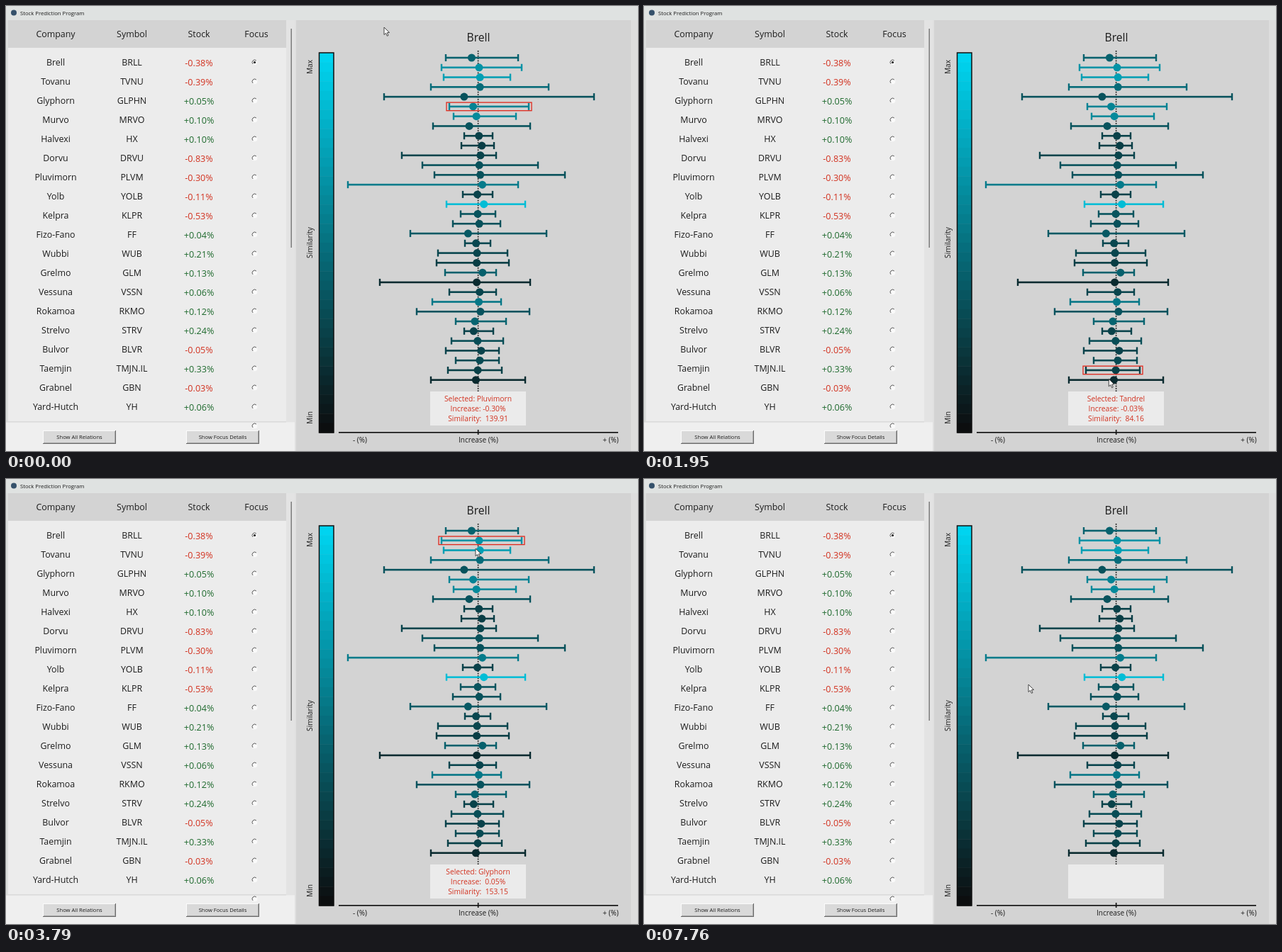
An HTML page with a canvas for the animation above (8140 ms loop, 891 by 628 pixels).

```html
<!DOCTYPE html>
<html lang="en">
<head>
<title>Stock Prediction Program</title>
<style>
html, body { margin: 0; width: 100%; height: 100%; overflow: hidden; background: #dfe2e1; }
canvas { display: block; width: 891px; height: 628px; }
</style>
</head>
<body>
<canvas id="stage" width="891" height="628"></canvas>
<script>
const LOOP = 8140, LAG = 56;
const FOCUS = 'Brell';
const RED = '#d2311f', GREEN = '#1f6a2e', INK = '#1c1c1c';
const CENTER = 665.5, ROW_TOP = 73, ROW_STEP = 13.78;
const ctx = document.getElementById('stage').getContext('2d');

// Table rows: name, symbol, change in percent
const listed = [
  [FOCUS, 'BRLL', '-0.38'], ['Tovanu', 'TVNU', '-0.39'], ['Glyphorn', 'GLPHN', '+0.05'],
  ['Murvo', 'MRVO', '+0.10'], ['Halvexi', 'HX', '+0.10'], ['Dorvu', 'DRVU', '-0.83'],
  ['Pluvimorn', 'PLVM', '-0.30'], ['Yolb', 'YOLB', '-0.11'], ['Kelpra', 'KLPR', '-0.53'],
  ['Fizo-Fano', 'FF', '+0.04'], ['Wubbi', 'WUB', '+0.21'], ['Grelmo', 'GLM', '+0.13'],
  ['Vessuna', 'VSSN', '+0.06'], ['Rokamoa', 'RKMO', '+0.12'], ['Strelvo', 'STRV', '+0.24'],
  ['Bulvor', 'BLVR', '-0.05'], ['Taemjin', 'TMJN.IL', '+0.33'], ['Grabnel', 'GBN', '-0.03'],
  ['Yard-Hutch', 'YH', '+0.06']
];
// Companies further down the scrolled list
const hidden = [
  ['Ondrel', '-0.60'], ['Vastim', '-0.13'], ['Horuzo', '-0.07'], ['Kembry', '-0.09'],
  ['Trovalt', '+0.25'], ['Ulmsten', '-0.09'], ['Parvolo', '+0.08'], ['Zennick', '+0.03'],
  ['Wexlund', '+0.13'], ['Cordumb', '-0.20'], ['Olvane', '-0.27'], ['Bruzel', '-0.04'],
  ['Haldune', '+0.17'], ['Merquil', '+0.09'], ['Tandrel', '-0.03'], ['Ixoline', '-0.14']
];
// Range ends and similarity of each chart row
const ranges = [
  [620, 722, 112.37], [614, 727, 153.15], [617, 711, 163.42], [599, 765, 120.18], [533, 829, 99.26],
  [625, 737, 139.91], [631, 719, 145.33], [602, 739, 100.11], [646, 686, 85.47], [642, 688, 82.09],
  [558, 691, 87.64], [587, 750, 98.72], [604, 788, 98.15], [482, 722, 133.58], [644, 686, 86.21],
  [621, 732, 188.20], [641, 690, 100.82], [630, 697, 98.43], [570, 762, 104.77], [647, 683, 90.36],
  [609, 707, 89.06], [607, 709, 82.51], [619, 691, 110.69], [527, 739, 66.84], [625, 691, 88.13],
  [601, 698, 130.25], [579, 738, 100.47], [634, 705, 113.92], [646, 687, 85.70], [628, 701, 94.97],
  [620, 695, 86.38], [634, 695, 92.54], [623, 699, 84.16], [599, 732, 66.29]
];
// Pointer waypoints: time, x, y
const path = [
  [0, 533, 30], [420, 625, 52], [700, 660, 100], [1530, 657, 361], [2000, 655, 530],
  [2460, 651, 448], [3360, 657, 58], [3790, 662, 98], [4460, 674, 281], [4910, 673, 282],
  [5180, 673, 282], [5440, 668, 295], [5940, 668, 295], [6170, 667, 300], [6550, 668, 306],
  [7070, 668, 306], [7500, 510, 298], [7760, 542, 290]
];

function shade(f) {
  const mix = (a, b) => Math.round(a + (b - a) * f);
  return `rgb(${mix(12, 0)},${mix(14, 212)},${mix(15, 240)})`;
}

const bars = listed.slice(1).map(([name, , change]) => [name, change]).concat(hidden)
  .map(([name, change], i) => {
    const [left, right, similarity] = ranges[i];
    return {
      name, left, right, similarity,
      change: parseFloat(change),
      y: ROW_TOP + ROW_STEP * i,
      color: shade((similarity - 43) / 164)
    };
  });

function slopeAt(i, axis) {
  if (i === 0 || i === path.length - 1) return 0;
  const a = path[i - 1], b = path[i], c = path[i + 1];
  if ((b[axis] - a[axis]) * (c[axis] - b[axis]) <= 0) return 0;
  return (c[axis] - a[axis]) / (c[0] - a[0]);
}

function pointerAt(t) {
  const last = path[path.length - 1];
  if (t >= last[0]) return { x: last[1], y: last[2] };
  const i = path.findIndex(p => p[0] > t) - 1;
  const a = path[i], b = path[i + 1], span = b[0] - a[0], s = (t - a[0]) / span;
  const along = axis => {
    const ease = s * s * (3 - 2 * s);
    return a[axis] + (b[axis] - a[axis]) * ease
      + span * s * (1 - s) * (slopeAt(i, axis) * (1 - s) - slopeAt(i + 1, axis) * s);
  };
  return { x: along(1), y: along(2) };
}

function selectedAt(t) {
  if (t < LAG) return bars[5];
  const { x, y } = pointerAt(t - LAG);
  const bar = bars[Math.round((y - ROW_TOP) / ROW_STEP)];
  return bar && x >= bar.left - 4 && x <= bar.right + 4 ? bar : null;
}

function box(color, x, y, w, h) {
  ctx.fillStyle = color;
  ctx.fillRect(x, y, w, h);
}

function label(text, x, y, size, color = INK, align = 'center') {
  ctx.font = `${size}px "Open Sans", "Noto Sans", sans-serif`;
  ctx.textAlign = align;
  ctx.fillStyle = color;
  ctx.fillText(text, x, y + size * 0.36);
}

function upright(text, y) {
  ctx.save();
  ctx.translate(428.5, y);
  ctx.rotate(-Math.PI / 2);
  label(text, 0, 0, 10.2);
  ctx.restore();
}

function disc(color, x, y, r) {
  ctx.fillStyle = color;
  ctx.beginPath();
  ctx.arc(x, y, r, 0, 7);
  ctx.fill();
}

function radio(x, y, checked) {
  disc('#fafafa', x, y, 3.8);
  ctx.strokeStyle = '#555';
  ctx.lineWidth = 1;
  ctx.beginPath();
  ctx.arc(x, y, 3.4, Math.PI * 0.75, Math.PI * 1.75);
  ctx.stroke();
  if (checked) disc('#111', x, y, 1.6);
}

function button(text, x, w) {
  box('#6c6c6c', x, 599, w, 19);
  box('#fbfbfb', x, 599, w - 1, 18);
  box('#a5a5a5', x + 1, 600, w - 2, 17);
  box('#d9d9d9', x + 1, 600, w - 3, 16);
  label(text, x + w / 2, 608.3, 7.6);
}

function drawTable() {
  box('#dfe2e1', 0, 0, 891, 628);
  disc('#35516b', 11, 9.5, 4);
  label('Stock Prediction Program', 20, 10, 7.7, INK, 'left');
  box('#ebebeb', 0, 20, 409, 608);
  box('#dcdedd', 0, 20, 3, 567);
  box('#e3e3e3', 395, 20, 14, 567);
  box('#ececec', 3, 59, 392, 527);
  box('#d3d3d3', 3, 20, 392, 39);
  box('#dadada', 0, 586, 395, 1.5);
  box('#efefef', 0, 588, 407, 40);
  box('#e0e0e0', 407, 20, 2, 608);
  box('#7d7d7d', 401.5, 32, 1.5, 309);
  [['Company', 70], ['Symbol', 177.5], ['Stock', 272], ['Focus', 353]]
    .forEach(([text, x]) => label(text, x, 40, 12.4));
  listed.forEach(([name, symbol, change], i) => {
    const y = 80 + 27 * i;
    label(name, 70, y, 12.4);
    label(symbol, 177.5, y, 12.4);
    label(change + '%', 272, y, 12.6, change[0] === '-' ? RED : GREEN);
    radio(350.5, y - 0.5, i === 0);
  });
  radio(350.5, 592.5, false);
  button('Show All Relations', 52, 103);
  button('Show Focus Details', 254, 103);
}

function drawScale() {
  box('#d3d3d3', 409, 20, 472, 608);
  box('#dddddd', 881, 20, 10, 608);
  label(FOCUS, 666, 44, 15.7);
  const steps = 40, top = 66, height = 536;
  for (let i = 0; i < steps; i++) {
    box(shade(1 - i / (steps - 1)), 442, top + i * height / steps, 20, height / steps + 0.5);
  }
  ctx.strokeStyle = '#111';
  ctx.lineWidth = 1.5;
  ctx.strokeRect(441.5, top, 20.5, height);
  upright('Max', 86);
  upright('Similarity', 334);
  upright('Min', 581);
  box('#151515', 469, 601, 394, 1.7);
  box('#151515', 664.8, 598, 1.7, 7);
  label('- (%)', 499, 612, 10);
  label('Increase (%)', 666, 612, 10);
  label('+ (%)', 852.5, 612, 10);
}

function drawBars() {
  for (let y = 63; y < 544; y += 3.4) box('#111', 664.8, y, 1.6, 1.7);
  for (const { left, right, y, change, color } of bars) {
    box(color, left, y - 1.3, right - left, 2.6);
    box(color, left - 1.2, y - 5, 2.4, 10);
    box(color, right - 1.2, y - 5, 2.4, 10);
    disc(color, CENTER + 0.3 + 24 * change, y, 5.5);
  }
}

function drawSelection(bar) {
  box('#ebebeb', 598, 544, 135, 48);
  if (!bar) return;
  ctx.strokeStyle = '#e0281c';
  ctx.lineWidth = 1.3;
  ctx.strokeRect(bar.left - 4, bar.y - 5.8, bar.right - bar.left + 8, 11.6);
  const gap = bar.change < 0 ? ' ' : '  ';
  label(`Selected: ${bar.name}`, CENTER, 554, 10.3, RED);
  label(`Increase:${gap}${bar.change.toFixed(2)}%`, CENTER, 568.3, 10.3, RED);
  label(`Similarity:  ${bar.similarity.toFixed(2)}`, CENTER, 582.5, 10.3, RED);
}

function drawPointer({ x, y }) {
  ctx.save();
  ctx.translate(x, y);
  ctx.beginPath();
  [[0, 0], [0, 10.5], [2.5, 8.3], [4.3, 12.3], [6, 11.5], [4.3, 7.7], [7.5, 7.4]]
    .forEach(([px, py]) => ctx.lineTo(px, py));
  ctx.closePath();
  ctx.fillStyle = '#fff';
  ctx.fill();
  ctx.strokeStyle = '#333';
  ctx.lineWidth = 0.9;
  ctx.stroke();
  ctx.restore();
}

function render(now) {
  const t = now % LOOP;
  drawTable();
  drawScale();
  drawBars();
  drawSelection(selectedAt(t));
  drawPointer(pointerAt(t));
}

const start = performance.now();
function tick() {
  render(performance.now() - start);
  requestAnimationFrame(tick);
}
tick();
</script>
</body>
</html>
```
